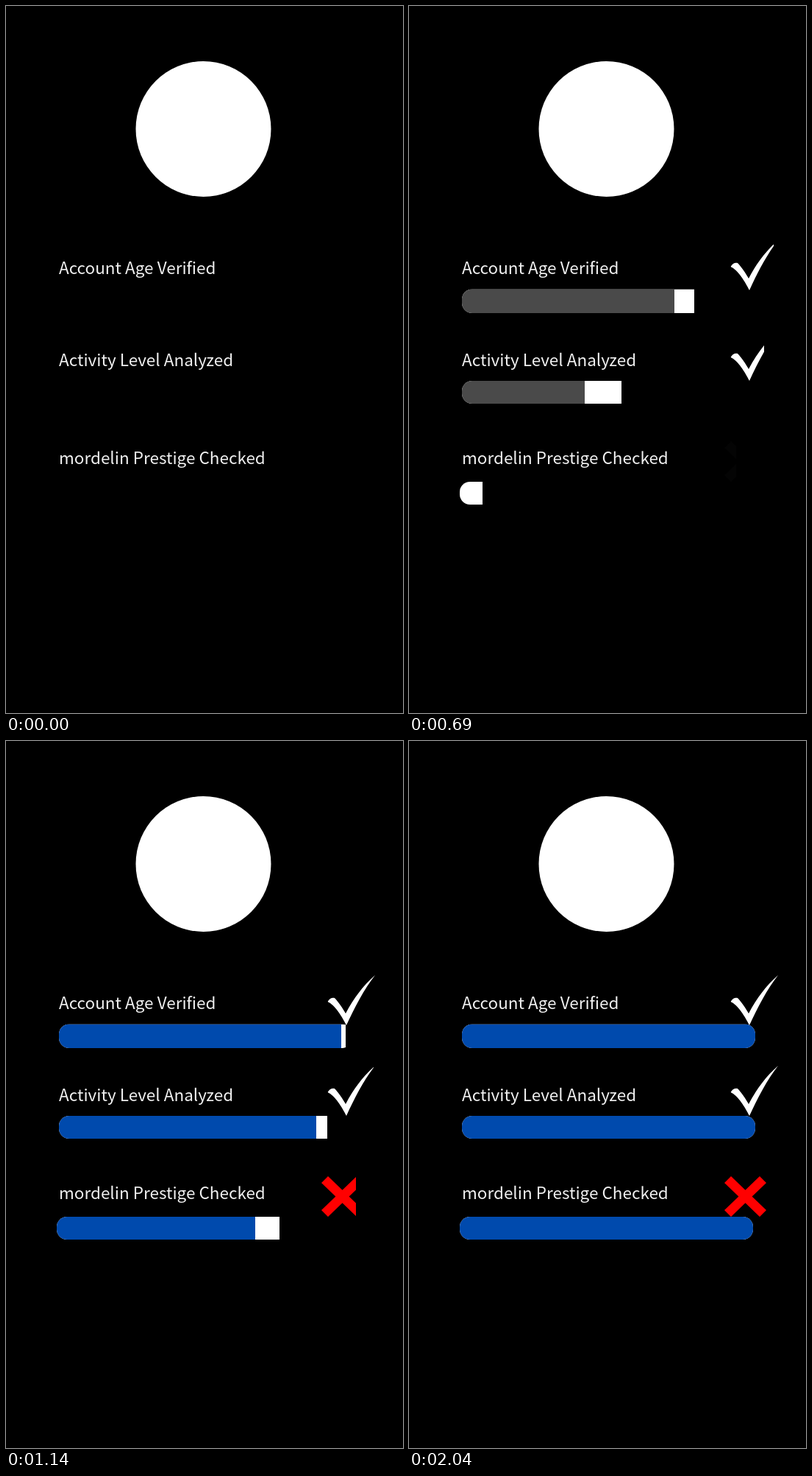
An HTML page that plays this animation: 540x960 px, repeating every 2280 ms.

```html
<!DOCTYPE html>
<html lang="en">
<head>
<meta charset="utf-8">
<title>Account check</title>
<style>
  html, body { margin: 0; height: 100%; overflow: hidden; background: #000; }
  svg { display: block; width: 100vw; height: 100vh; }
  text { font: 22.5px "Noto Sans CJK JP", "Noto Sans CJK SC", "Noto Sans", sans-serif; fill: #f0f0f0; }
  .white { fill: #fff; }
  .fill { fill: #004aad; }
  .cross { fill: #f00; }
  .mono .fill { fill: #4a4a4a; }
  .mono .cross { fill: #040404; }
</style>
</head>
<body>
<svg id="stage" viewBox="0 0 540 960">
  <circle class="white" cx="268.5" cy="167" r="92"/>
  <text x="72" y="364">Account Age Verified</text>
  <text x="72" y="489">Activity Level Analyzed</text>
  <text x="72" y="622">mordelin Prestige Checked</text>
</svg>
<script>
const LOOP = 2280, STEP = 30, COLOR_AT = 780;
const stage = document.getElementById('stage');
const wipes = [];

// Adds a shape that is uncovered from left to right between two times.
function addWipe(tag, attrs, start, end) {
  const el = document.createElementNS('http://www.w3.org/2000/svg', tag);
  for (const key in attrs) el.setAttribute(key, attrs[key]);
  stage.append(el);
  wipes.push({ el, start, end, width: el.getBBox().width });
}

function addBar(x, y, height, white, fill) {
  const box = { x, y, width: 399, height, rx: 14 };
  addWipe('rect', { ...box, class: 'white' }, ...white);
  addWipe('rect', { ...box, class: 'fill' }, ...fill);
}

function addTick(y, start, end) {
  const d = `M437.5 ${y + 36}c2.5-5 6.5-6 9.5-5c5 5 11 14 15 21c11-21 24-38 40-52` +
            'c-15 19-28 44-39 68c-6-12-16-28-25.5-32z';
  addWipe('path', { d, class: 'white' }, start, end);
}

addBar(72, 384.4, 32.6, [99, 1550], [190, 1619]);
addBar(72, 509, 31, [375, 1741], [469, 1803]);
addBar(69, 646, 31, [656, 1936], [749, 1997]);
addTick(318, 80, 1191);
addTick(441, 300, 1480);
addWipe('path', {
  class: 'cross',
  d: 'M429 600L438 591L457.5 609.7L477 591L486 600L466.6 618.5' +
     'L486 637L477 646L457.5 627.3L438 646L429 637L448.4 618.5Z'
}, 551, 1885);

function draw(t) {
  stage.classList.toggle('mono', t < COLOR_AT);
  for (const { el, start, end, width } of wipes) {
    const left = Math.min(1, Math.max(0, (end - t) / (end - start)));
    // Wipe edges fall on whole pixels.
    el.style.clipPath = `inset(0 ${Math.round(width * left ** 3)}px 0 0)`;
    el.style.visibility = left < 1 ? 'visible' : 'hidden';
  }
}

const origin = performance.now();
function tick() {
  const t = (performance.now() - origin) % LOOP;
  draw(Math.floor(t / STEP) * STEP);
  requestAnimationFrame(tick);
}
tick();
</script>
</body>
</html>
```
